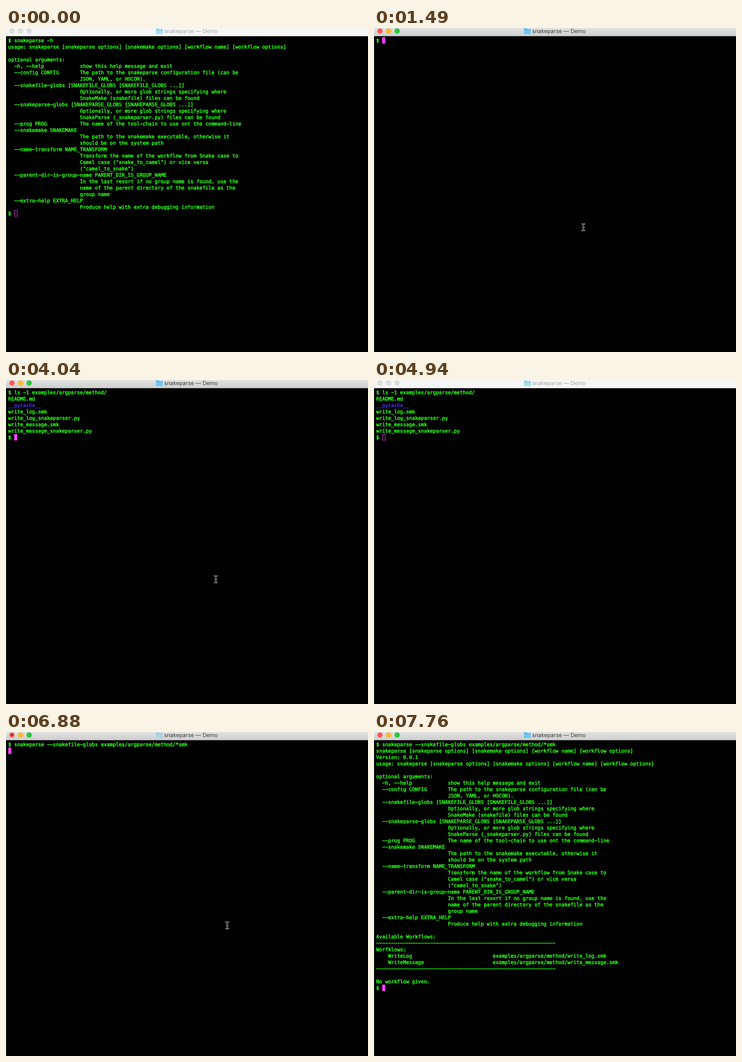
Recreate the animation shown at these times as an HTML page with a canvas. Size 792x708 px, loop 8 s.

```html
<!DOCTYPE html>
<html lang="en">
<head>
<meta charset="utf-8">
<title>Terminal demo</title>
<style>
html, body { margin: 0; width: 100%; height: 100%; overflow: hidden; background: #000; }
canvas { display: block; }
</style>
</head>
<body>
<canvas id="stage" width="792" height="708"></canvas>
<script>
const LOOP = 8000;
const BAR = 18, LEFT = 4.8, TOP = 20, CELL = 6.54, LINE = 14;
const GREEN = '#28fe14', BLUE = '#4b32f0', MAGENTA = '#ff40ff';
const ctx = document.getElementById('stage').getContext('2d');

const opt = (name, text) => ('  ' + name).padEnd(24) + text;
const rule = '-'.repeat(60);
const flow = (name, file) => ('    ' + name).padEnd(39) + 'examples/argparse/method/' + file;

const help = [
  'usage: snakeparse [snakeparse options] [snakemake options] [workflow name] [workflow options]',
  '',
  'optional arguments:',
  opt('-h, --help', 'show this help message and exit'),
  opt('--config CONFIG', 'The path to the snakeparse configuration file (can be'),
  opt('', 'JSON, YAML, or HOCON).'),
  '  --snakefile-globs [SNAKEFILE_GLOBS [SNAKEFILE_GLOBS ...]]',
  opt('', 'Optionally, or more glob strings specifying where'),
  opt('', 'SnakeMake (snakefile) files can be found'),
  '  --snakeparse-globs [SNAKEPARSE_GLOBS [SNAKEPARSE_GLOBS ...]]',
  opt('', 'Optionally, or more glob strings specifying where'),
  opt('', 'SnakeParse (_snakeparser.py) files can be found'),
  opt('--prog PROG', 'The name of the tool-chain to use ont the command-line'),
  '  --snakemake SNAKEMAKE',
  opt('', 'The path to the snakemake executable, otherwise it'),
  opt('', 'should be on the system path'),
  '  --name-transform NAME_TRANSFORM',
  opt('', 'Transform the name of the workflow from Snake case to'),
  opt('', 'Camel case ("snake_to_camel") or vice versa'),
  opt('', '("camel_to_snake")'),
  '  --parent-dir-is-group-name PARENT_DIR_IS_GROUP_NAME',
  opt('', 'In the last resort if no group name is found, use the'),
  opt('', 'name of the parent directory of the snakefile as the'),
  opt('', 'group name'),
  '  --extra-help EXTRA_HELP',
  opt('', 'Produce help with extra debugging information')
];

const helpScreen = ['$ snakeparse -h', ...help, '$ '];
const emptyScreen = ['$ '];
const listScreen = [
  '$ ls -1 examples/argparse/method/', 'README.md', '__pycache__',
  'write_log.smk', 'write_log_snakeparser.py',
  'write_message.smk', 'write_message_snakeparser.py', '$ '
];
const command = '$ snakeparse --snakefile-globs examples/argparse/method/*smk';
const runScreen = [command, ''];
const resultScreen = [
  command,
  'snakeparse [snakeparse options] [snakemake options] [workflow name] [workflow options]',
  'Version: 0.0.1',
  ...help,
  '', 'Available Workflows:', rule, 'Worfklows:',
  flow('WriteLog', 'write_log.smk'),
  flow('WriteMessage', 'write_message.smk'),
  rule, '', 'No workflow given.', '$ '
];

// Each track holds [start time, value...] steps.
const screens = [[0, helpScreen], [1490, emptyScreen], [1940, listScreen],
  [6430, emptyScreen], [6880, runScreen], [7170, resultScreen]];
const focus = [[0, false], [900, true], [4940, false], [5840, true]];
const edited = [[0, false], [6880, true], [7320, false]];
const pointers = [[0, null],
  [450, drawArrow, 756, 435], [600, drawArrow, 465, 433], [750, drawArrow, 457, 434],
  [900, drawBeam, 458, 436.5], [1040, drawBeam, 458, 435.5], [4040, drawBeam, 459, 435.5],
  [4190, drawBeam, 760, 431.5], [4340, null],
  [5390, drawArrow, 752, 440], [5540, drawArrow, 483, 420],
  [5840, drawBeam, 484, 422.5], [7760, null]];

const stepAt = (track, t) => track.findLast(step => step[0] <= t);
const valueAt = (track, t) => stepAt(track, t)[1];

function polygon(...points) {
  ctx.beginPath();
  points.forEach(([x, y]) => ctx.lineTo(x, y));
  ctx.closePath();
}

function drawArrow(x, y) {
  ctx.save();
  ctx.translate(x, y);
  polygon([0.5, 0.8], [0.5, 13], [3.4, 10.5], [5.4, 15.3], [7.6, 14.4], [5.7, 9.8], [9.4, 9.6]);
  ctx.fillStyle = '#000';
  ctx.fill();
  ctx.strokeStyle = '#e8e8e8';
  ctx.lineWidth = 1;
  ctx.stroke();
  ctx.restore();
}

function drawBeam(x, y) {
  ctx.save();
  ctx.translate(x, y);
  ctx.beginPath();
  for (const s of [-1, 1]) {
    ctx.moveTo(-2.9, s * 7.3);
    ctx.quadraticCurveTo(-0.5, s * 7.2, 0, s * 5);
    ctx.quadraticCurveTo(0.5, s * 7.2, 2.9, s * 7.3);
  }
  ctx.moveTo(0, -5);
  ctx.lineTo(0, 5);
  ctx.moveTo(-1.5, 0.5);
  ctx.lineTo(1.5, 0.5);
  ctx.lineCap = 'round';
  for (const [color, width] of [['#cfcfcf', 2.6], ['#000', 1]]) {
    ctx.strokeStyle = color;
    ctx.lineWidth = width;
    ctx.stroke();
  }
  ctx.restore();
}

function dot(x, y, r, color) {
  ctx.beginPath();
  ctx.arc(x, y, r, 0, 2 * Math.PI);
  ctx.fillStyle = color;
  ctx.fill();
}

function drawFolder(back, front) {
  ctx.fillStyle = back;
  ctx.beginPath();
  ctx.roundRect(328, 1, 6.5, 5, 1);
  ctx.roundRect(328, 2.2, 15, 10.8, 1);
  ctx.fill();
  ctx.fillStyle = front;
  ctx.beginPath();
  ctx.roundRect(328, 4, 15, 9, 1);
  ctx.fill();
}

function drawTitleBar(active, dirty) {
  const shade = ctx.createLinearGradient(0, 0, 0, BAR);
  shade.addColorStop(0, active ? '#e2e2e2' : '#f6f6f6');
  shade.addColorStop(1, active ? '#cecece' : '#f6f6f6');
  ctx.fillStyle = shade;
  ctx.fillRect(0, 0, 792, BAR);
  ctx.fillStyle = active ? '#b4b4b4' : '#dcdcdc';
  ctx.fillRect(0, BAR - 1, 792, 1);

  const lights = [[13, '#fc5b57', '#e9504b'], [32, '#fdbc2e', '#e8a92a'], [50.5, '#27c83f', '#22b537']];
  for (const [x, fill, rim] of lights) {
    dot(x, 6.5, 5.8, active ? rim : '#d2d2d2');
    dot(x, 6.5, 5.2, active ? fill : '#dcdcdc');
  }
  if (dirty) dot(13, 6.5, 1.9, '#5c0a08');

  if (dirty) drawFolder('#9acbe4', '#a5d3ea');
  else if (active) drawFolder('#4fb4e8', '#68c8f8');
  else drawFolder('#8fd0f0', '#a2dcf8');

  ctx.font = '12px Inter, sans-serif';
  ctx.textAlign = 'center';
  ctx.fillStyle = active ? '#3a3a3a' : '#a6a6a6';
  ctx.fillText('snakeparse — Demo', 404.5, 11.2);
}

function drawText(lines) {
  ctx.textAlign = 'left';
  ctx.lineJoin = 'round';
  ctx.lineWidth = 0.6;
  lines.forEach((line, row) => {
    const isFolder = line === '__pycache__';
    ctx.font = (isFolder ? 'bold ' : '') + '10.863px "DejaVu Sans Mono", monospace';
    ctx.fillStyle = ctx.strokeStyle = isFolder ? BLUE : GREEN;
    // The terminal face has wide hyphens.
    const shown = line.replaceAll('-', '\u2212');
    const y = TOP + row * LINE + 11;
    ctx.fillText(shown, LEFT, y);
    if (!isFolder) ctx.strokeText(shown, LEFT, y);
  });
}

function drawCaret(lines, active) {
  const row = lines.length - 1;
  const x = Math.round(LEFT + lines[row].length * CELL), y = TOP + row * LINE;
  if (active) {
    ctx.fillStyle = MAGENTA;
    ctx.fillRect(x, y, CELL, LINE);
  } else {
    ctx.strokeStyle = '#e83ce8';
    ctx.lineWidth = 1;
    ctx.strokeRect(x + 0.5, y + 0.5, 6, LINE - 1);
  }
}

function draw(t) {
  const lines = valueAt(screens, t), active = valueAt(focus, t);
  ctx.fillStyle = '#000';
  ctx.fillRect(0, 0, 792, 708);
  ctx.fillStyle = '#16281a';
  ctx.fillRect(0, BAR, 1, 708 - BAR);
  drawTitleBar(active, valueAt(edited, t));
  drawText(lines);
  drawCaret(lines, active);
  const [, pointer, x, y] = stepAt(pointers, t);
  if (pointer) pointer(x, y);
}

ctx.textRendering = 'geometricPrecision';
const start = performance.now();
function tick() {
  draw((performance.now() - start) % LOOP);
  requestAnimationFrame(tick);
}
tick();
</script>
</body>
</html>
```
